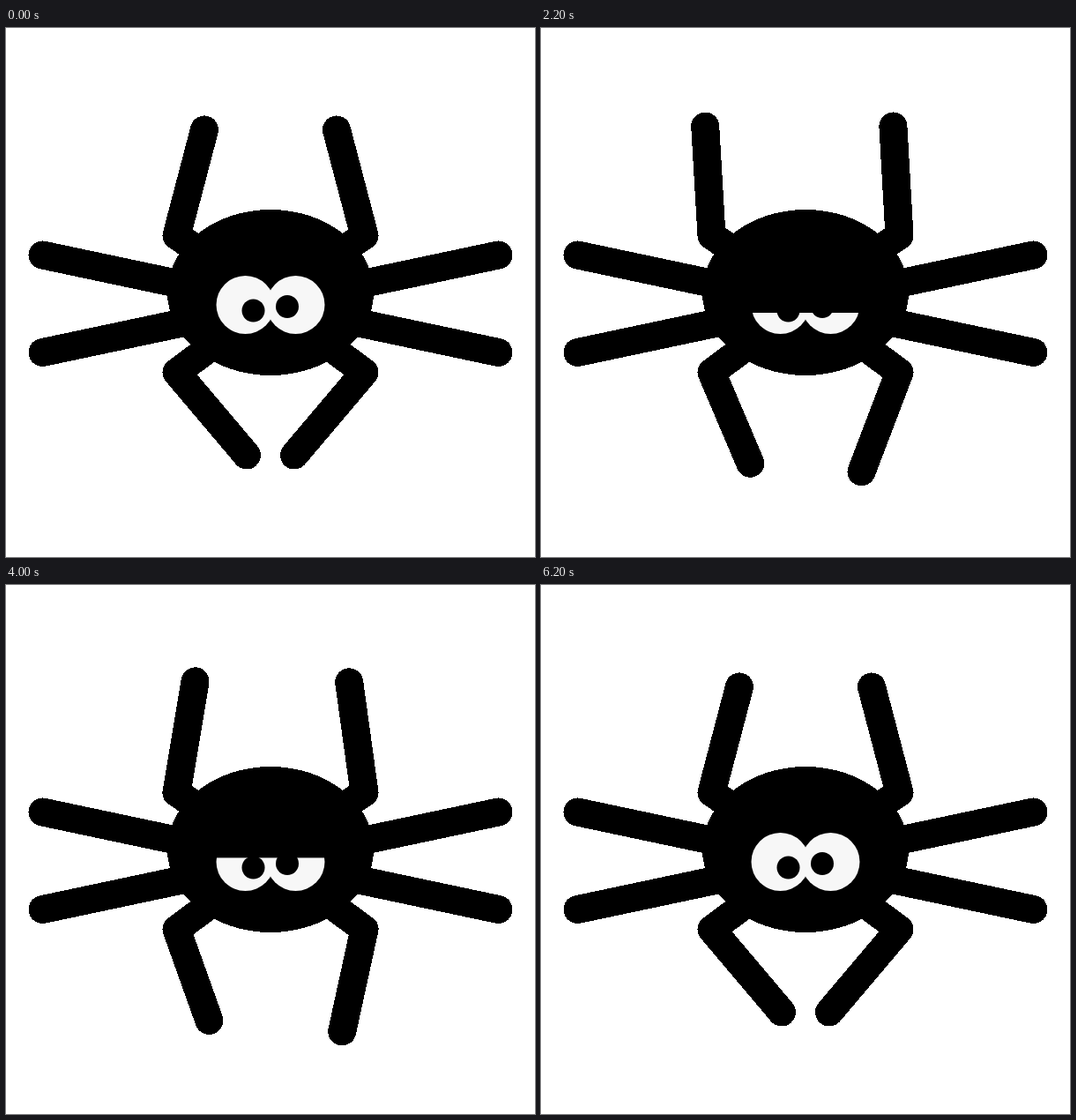
Write an HTML page that moves like this. It is 600x600 px and loops after 6.4 s.

```html
<!DOCTYPE html>
<html lang="en">
<head>
<meta charset="utf-8">
<title>Spider</title>
<style>
  html, body { margin: 0; width: 100%; height: 100%; overflow: hidden; background: #fff; }
  svg { display: block; width: 600px; height: 600px; }
  .limb { fill: none; stroke: #000; stroke-width: 32; stroke-linecap: round; stroke-linejoin: round; }
</style>
</head>
<body>
<svg viewBox="0 0 600 600">
  <g shape-rendering="crispEdges">
    <g id="limbs"></g>
    <ellipse cx="300" cy="300" rx="117" ry="94"/>
  </g>
  <g fill="#f7f7f7">
    <circle cx="271.5" cy="314" r="33"/>
    <circle cx="328.5" cy="314" r="33"/>
  </g>
  <circle cx="280.5" cy="320.5" r="13"/>
  <circle cx="319" cy="316" r="13"/>
  <rect id="lid" x="230" y="270" width="140"/>
</svg>
<script>
const LOOP = 6400, STEP = 200, CYCLE = 15;
const limbs = document.getElementById('limbs');
const lid = document.getElementById('lid');

const upper = { foot: [75, 115.5], knee: [106.5, 235.5], hip: [57, 269] };
const lower = { foot: [27, 484.5], knee: [106.5, 390.5], hip: [57, 354] };

// each foot is moved [outward, down] from rest at these steps
const beats = [0, 2, 7, 11, 13, 15];
const legs = [
  { ...upper, side: -1, swing: [[35.5, -6], [-27, -6.5], [23, -3], [1.5, -1.5]] },
  { ...upper, side: 1, swing: [[39, -2], [-23, -10], [2.5, -2], [17, -4]] },
  { ...lower, side: -1, swing: [[25, 6], [69, 14.5], [24.5, -1], [21.5, 10]] },
  { ...lower, side: 1, swing: [[51, 18.5], [59, 27], [29, 7.5], [30, 12.5]] }
];

function addLimb() {
  const el = document.createElementNS('http://www.w3.org/2000/svg', 'polyline');
  el.setAttribute('class', 'limb');
  return limbs.appendChild(el);
}

// points are given as distance from the middle line, and height
function place(el, side, ...pts) {
  el.setAttribute('points', pts.map(([x, y]) => `${300 + side * x},${y}`).join(' '));
}

function footAt(leg, s) {
  const keys = [[0, 0], ...leg.swing, [0, 0]];
  const i = beats.findLastIndex(b => b <= s);
  const k = (s - beats[i]) / (beats[i + 1] - beats[i]);
  let [x, y] = leg.foot.map((v, j) => v + keys[i][j] + (keys[i + 1][j] - keys[i][j]) * k);
  // quick kick while the eyes are nearly shut
  if (s > 7 && s < 11) {
    const a = Math.PI * (s - 7) / 4;
    if (leg.foot === upper.foot) {
      x += 40 * Math.sin(a);
      y -= 31 * Math.max(0, Math.sin(2 * a));
    } else {
      y += 9 * Math.sin(a);
    }
  }
  return [x, y];
}

for (const side of [-1, 1]) {
  place(addLimb(), side, [258.5, 257.5], [60, 299.5]);
  place(addLimb(), side, [258.5, 368], [60, 326]);
}
for (const leg of legs) leg.el = addLimb();

function draw(s) {
  for (const leg of legs) place(leg.el, leg.side, footAt(leg, s), leg.knee, leg.hip);
  // the lid sinks, then lifts, at an even pace
  lid.setAttribute('height', Math.min(6.6 + 8.2 * s, 133 - 8 * s));
}

// the rest pose lasts two steps at the start of the loop
function tick() {
  const t = performance.now() % LOOP;
  draw(Math.max(0, Math.floor(t / STEP) - 1) % CYCLE);
  requestAnimationFrame(tick);
}
tick();
</script>
</body>
</html>
```
